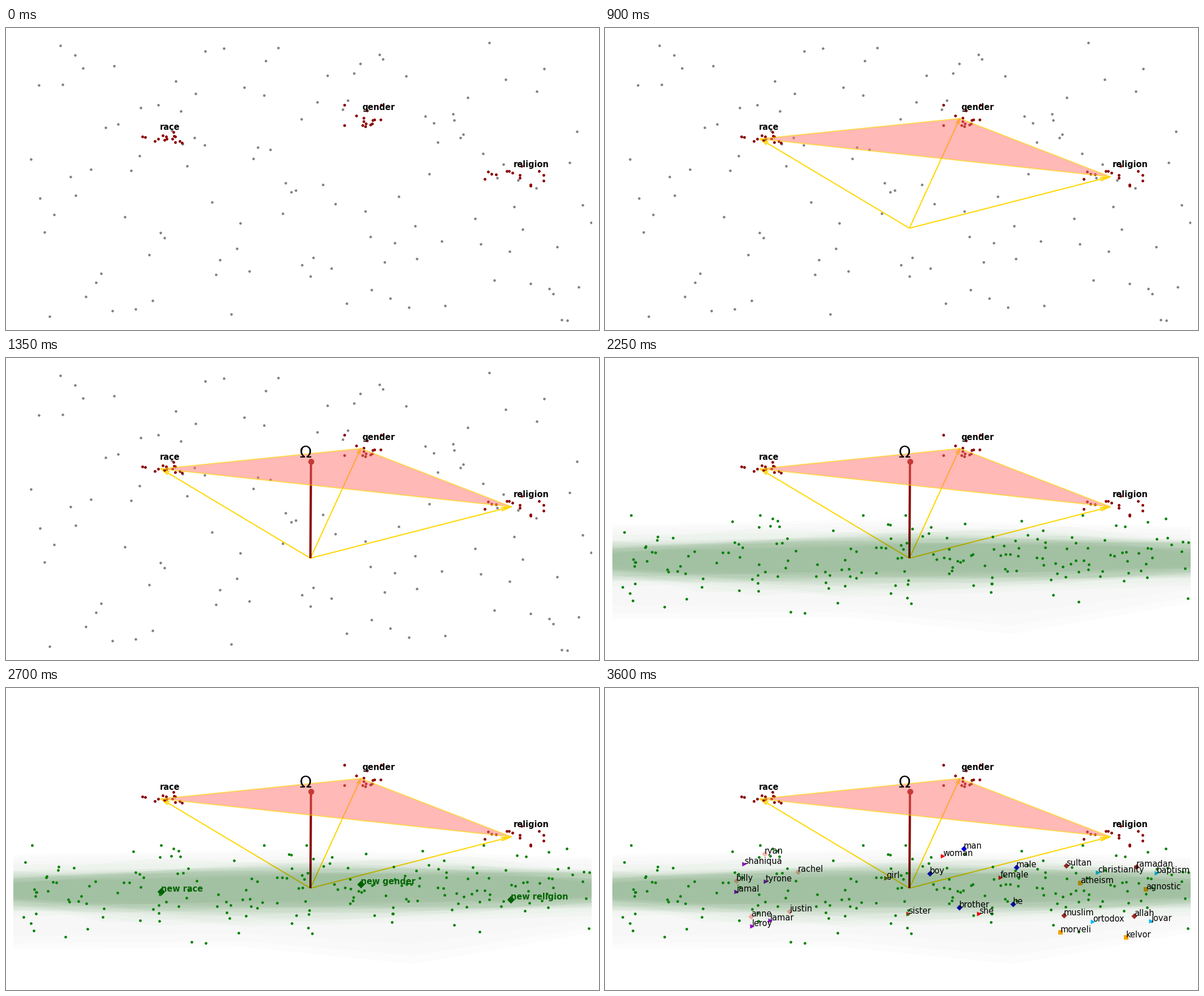
Animation of 1048x534 px, one loop 5.4 s. Source, as a matplotlib script:

```python
import numpy as np
import matplotlib.pyplot as plt
from matplotlib.animation import FuncAnimation
from matplotlib.patches import Polygon

W, H, DPI = 1048, 534, 100
LEFT, RIGHT = 13, 1035
STEP_MS, LOOP_MS, LAST = 450, 5400, 8
PX = 72 / DPI
FONT = 14.5 * PX
DARK_RED, DARK_GREEN, GOLD = "#8b0000", "#006400", "#ffd700"
ORIGIN = np.array([538, 354])

rng = np.random.default_rng(12)

plt.rcParams["font.family"] = "DejaVu Sans"
fig = plt.figure(figsize=(W / DPI, H / DPI), dpi=DPI, facecolor="white")
ax = fig.add_axes([LEFT / W, 0, (RIGHT - LEFT) / W, 1])
ax.set_xlim(LEFT, RIGHT)
ax.set_ylim(H, 0)
ax.set_autoscale_on(False)
ax.axis("off")

layers = []


def show(artist, start, end=LAST + 1):
    """Keep the artist visible for steps start <= step < end."""
    layers.append((artist, start, end))


def dots(points, color, start, end=LAST + 1, size=4.7, marker="o", z=3.0):
    x, y = np.asarray(points, float).T
    show(ax.scatter(x, y, s=(size * PX) ** 2, c=color, marker=marker,
                    linewidths=0, zorder=z), start, end)


def line(points, color, width, start, z):
    x, y = np.asarray(points, float).T
    show(ax.plot(x, y, color=color, lw=width * PX, zorder=z,
                 solid_capstyle="butt")[0], start)


def label(x, y, text, start, end=LAST + 1, color="black", size=FONT,
          weight="normal"):
    show(ax.text(x, y, text, color=color, fontsize=size, weight=weight,
                 va="baseline", zorder=8), start, end)


def polygon(points, start, z, **style):
    show(ax.add_patch(Polygon(points, zorder=z, **style)), start)


def arrow(tip):
    """Gold line from the origin with a slender open head."""
    back = ORIGIN - tip
    side = 3 * np.array([-back[1], back[0]]) / np.hypot(*back)
    neck = tip + .05 * back
    line([ORIGIN, tip], GOLD, 2, 1, 2.5)
    line([neck + side, tip, neck - side], GOLD, 2, 1, 2.5)


def spread_evenly(x0, x1, y0, y1, n):
    """Spread n points over a box, one per column and one per row."""
    x = x0 + (np.arange(n) + rng.random(n)) * (x1 - x0) / n
    y = y0 + (rng.permutation(n) + rng.random(n)) * (y1 - y0) / n
    return np.column_stack([x, y])


def cluster(center, sd, n, limit=1.8):
    return center + rng.normal(size=(n, 2)).clip(-limit, limit) * sd


# Background word cloud
dots(spread_evenly(42, RIGHT, 23, 520, 122), "#808080", 0, 5, size=4.5, z=1)

# Bias groups: arrow tip, spread of words, label, projected centre
groups = {
    "race": ((274, 196), (21, 6), (272, 180), (274, 360)),
    "gender": ((627, 160), (19, 13), (629, 144.5), (627, 347)),
    "religion": ((893, 263), (29, 15), (897, 246), (892, 374)),
}
for name, (tip, sd, pos, center) in groups.items():
    tip = np.array(tip)
    label(*pos, name, 0, weight="bold")
    dots(cluster(tip + (5, -1), sd, 15), DARK_RED, 0, size=4.9)
    arrow(tip)
    dots([center], DARK_GREEN, 6, 8, size=9.6, marker="D", z=3.2)
    label(*center, "new " + name, 6, 8, color=DARK_GREEN, weight="bold")

# Plane through the groups, then its direction
polygon([g[0] for g in groups.values()], 2, 4, fc=(1, .46, .43, .5),
        ec=(1, .84, 0, .6), lw=2 * PX)
line([ORIGIN, (539, 183)], DARK_RED, 4, 3, 3.5)
dots([(539, 183)], DARK_RED, 3, size=10.5, z=3.5)
label(519, 176.5, "Ω", 3, size=28 * PX)

# Neutral plane seen edge-on: thin sheets, narrower at both ends
for _ in range(19):
    top = rng.triangular(290, 318, 344, 3)
    low = rng.triangular(366, 400, 428, 3)
    middle = rng.uniform(345, 370, 3)
    pinch = np.array([.65, 1, .65])
    top = middle + (top - middle) * pinch
    low = middle + (low - middle) * pinch
    x = np.array([LEFT, rng.uniform(150, 900), RIGHT])
    polygon(np.column_stack([np.r_[x, x[::-1]], np.r_[top, low[::-1]]]), 4, 6,
            fc=DARK_GREEN, alpha=.02, lw=0)
for d in (0, 10, 24):
    polygon([(LEFT, 295 + d / 2), (500, 285 + d / 2), (RIGHT, 299 + d / 2),
             (RIGHT, 433 - d), (720, 488 - 1.5 * d), (420, 458 - d),
             (LEFT, 462 - d)], 4, 6, fc="#405040", alpha=.012, lw=0)

# Projected words
dots(np.column_stack([rng.uniform(27, RIGHT, 190),
                      rng.normal(354, 40, 190).clip(278, 490)]),
     "#008000", 4, z=7)

# Example words by class
classes = [
    ("D", "#ffb6b0", [("ryan", 282, 293), ("rachel", 341, 325),
                      ("billy", 232, 341), ("anne", 258, 404),
                      ("justin", 326, 395)]),
    (">", "#9400d3", [("shaniqua", 246, 311), ("tyrone", 284, 342),
                      ("jamal", 232, 360), ("lamar", 292, 411),
                      ("leroy", 260, 421)]),
    ("D", "#0000e0", [("man", 634, 284), ("boy", 574, 328),
                      ("male", 727, 317), ("brother", 626, 388),
                      ("he", 721, 382)]),
    (">", "#ff0000", [("woman", 597, 297), ("girl", 497, 336),
                      ("female", 699, 335), ("sister", 536, 399),
                      ("she", 661, 399)]),
    ("D", "#a52a2a", [("sultan", 815, 314), ("ramadan", 939, 316),
                      ("muslim", 811, 402), ("allah", 935, 403)]),
    (">", "#00bfff", [("christianity", 871, 326), ("baptism", 975, 327),
                      ("ortodox", 862, 413), ("jovar", 965, 412)]),
    ("s", "#ffa500", [("atheism", 840, 345), ("agnostic", 956, 356),
                      ("morveli", 805, 432), ("kelvor", 921, 441)]),
]
for marker, color, words in classes:
    size = 8 if marker == ">" else 7.2
    dots([(x, y) for _, x, y in words], color, 7, size=size,
         marker=marker, z=3.4)
    for word, x, y in words:
        label(x, y, word, 7)


def update(i):
    step = min(i, LAST)
    for artist, start, end in layers:
        artist.set_visible(start <= step < end)
    return [a for a, _, _ in layers]


anim = FuncAnimation(fig, update, frames=LOOP_MS // STEP_MS,
                     init_func=lambda: update(0), interval=STEP_MS,
                     repeat=True, blit=False)
plt.show()
```
